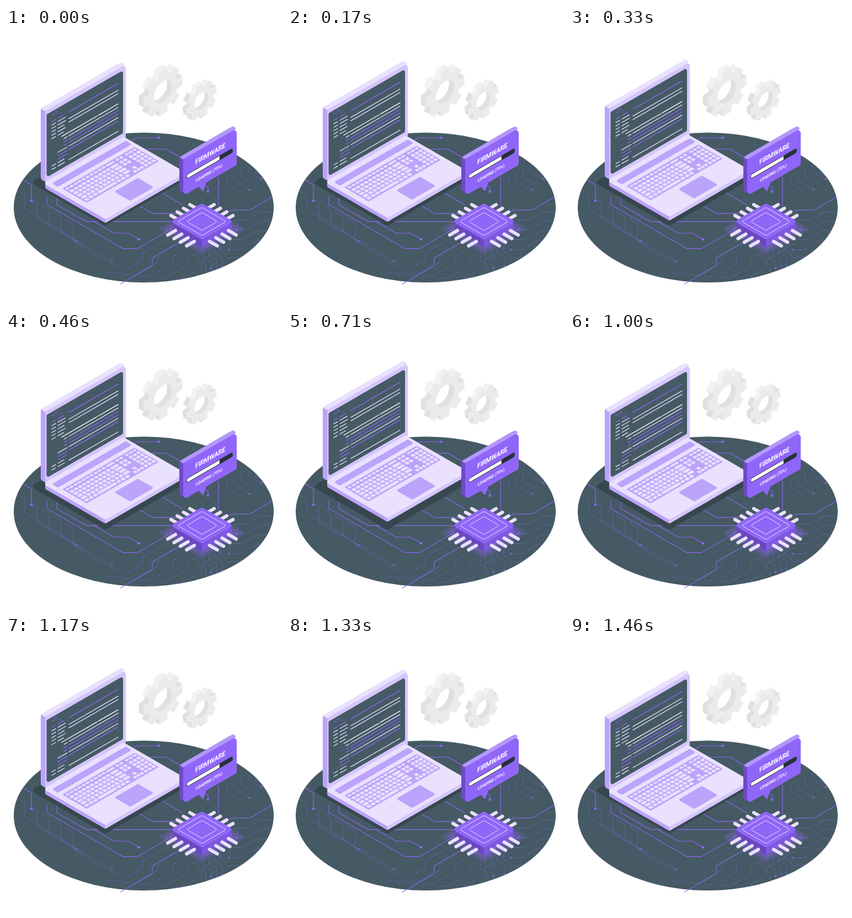
Recreate the animation shown at these times as an HTML page with a canvas. Size 500 px wide and 500 px high, loop 1.5 s.

```html
<!DOCTYPE html>
<html lang="en">
<head>
<meta charset="utf-8">
<title>Firmware</title>
<style>
html, body { margin: 0; width: 100%; height: 100%; overflow: hidden; background: #fff; }
canvas { display: block; width: 100%; height: 100%; }
</style>
</head>
<body>
<canvas id="stage" width="500" height="500"></canvas>
<script>
const ctx = document.getElementById('stage').getContext('2d');
const PURPLE = '#9066f8', MID = '#bca3fb', SOFT = '#d5c5fd', PALE = '#e9e1fd';
const SLATE = '#455a64', DARK = '#263238';
const LOOP = 1500, STEPS = 36, LIFT = 10;
const COS = Math.cos(Math.PI / 6), SLOPE = Math.tan(Math.PI / 6);

function seeded(seed) {
  return () => (seed = seed * 16807 % 2147483647) / 2147483647;
}

function rounded(points, r) {
  const [ax, ay] = points[0], [zx, zy] = points.at(-1);
  ctx.beginPath();
  ctx.moveTo((ax + zx) / 2, (ay + zy) / 2);
  points.forEach((p, i) => ctx.arcTo(...p, ...points[(i + 1) % points.length], r));
  ctx.closePath();
}

function shape(points, color, r = 0) {
  rounded(points, r);
  ctx.fillStyle = color;
  ctx.fill();
}

function line(x1, y1, x2, y2, color, width) {
  ctx.strokeStyle = color;
  ctx.lineWidth = width;
  ctx.beginPath();
  ctx.moveTo(x1, y1);
  ctx.lineTo(x2, y2);
  ctx.stroke();
}

function disc(x, y, rx, ry, color) {
  ctx.fillStyle = color;
  ctx.beginPath();
  ctx.ellipse(x, y, rx, ry, 0, 0, 7);
  ctx.fill();
}

// Floor rectangle from its left corner: a runs up-right, b runs down-right.
function floor(x, y, a, b) {
  const at = (u, v) => [x + u + v, y + (v - u) * SLOPE];
  return [at(0, 0), at(a, 0), at(a, b), at(0, b)];
}

// Wall rectangle from its top left corner.
function wall(x, y, w, h) {
  return [[x, y], [x + w, y - w * SLOPE], [x + w, y - w * SLOPE + h], [x, y + h]];
}

function slab(x, y, a, b, height, [top, left, right], r) {
  const sides = ctx.createLinearGradient(x, 0, x + a + b, 0), corner = b / (a + b);
  [[0, left], [corner, left], [corner, right], [1, right]].forEach(s => sides.addColorStop(...s));
  for (let dy = height; dy > 0; dy -= 0.5) shape(floor(x, y + dy, a, b), sides, r);
  shape(floor(x, y, a, b), top, r);
}

function panel(x, y, w, h, depth, [top, left, front], r) {
  const rise = depth * SLOPE;
  for (let d = depth; d > 0; d -= 0.5) shape(wall(x - d, y - d * SLOPE, w, h), left, r);
  shape([[x - depth, y - rise], [x + w - depth, y - w * SLOPE - rise], [x + w, y - w * SLOPE], [x, y]], top, 2);
  shape(wall(x, y, w, h), front, r);
}

function onPlane(x, y, isFloor, draw) {
  ctx.save();
  ctx.transform(COS, -0.5, isFloor ? COS : 0, isFloor ? 0.5 : 1, x, y);
  draw();
  ctx.restore();
}

function box(x, y, w, h, r, color) {
  ctx.fillStyle = color;
  ctx.beginPath();
  ctx.roundRect(x, y, w, h, r);
  ctx.fill();
}

// Moves: h across, v down, d down-right, u up-right; lengths may be negative.
function trace(x, y, moves, width, end) {
  ctx.strokeStyle = PURPLE;
  ctx.lineWidth = width;
  ctx.beginPath();
  ctx.moveTo(x, y);
  moves.split(' ').forEach(move => {
    const n = parseFloat(move.slice(1));
    x += move[0] === 'v' ? 0 : n;
    y += n * { h: 0, v: 1, d: SLOPE, u: -SLOPE }[move[0]];
    ctx.lineTo(x, y);
  });
  ctx.stroke();
  if (end) disc(x, y, 2.6, 2, PURPLE);
}

function dimCircuit() {
  const random = seeded(11), upTo = n => random() * n;
  ctx.globalAlpha = 0.5;
  for (let i = 0; i < 5; i++) {
    trace(20 + i * 22, 294 + i * 13, `d14 v${26 + upTo(8)} d${60 + upTo(40)}`, 0.8, i % 2);
    trace(182 + i * 30, 444 + i * 3, `h${26 - i * 3} u40 v-13 u52`, 0.8);
    trace(388 - i * 10, 388 + i * 5, `v${12 + upTo(10)} d14 v${10 + upTo(10)}`, 0.8, i % 2);
    trace(484 - i * 3, 333 + i * 17, `h${-16 - upTo(8)} u${-22 - upTo(12)} h-20`, 0.8, i % 2);
    trace(400 + i * 13, 268 - i * 6, `v${10 + upTo(8)} d${20 + upTo(10)}`, 0.8, i % 2);
  }
  ctx.globalAlpha = 1;
}

function brightCircuit() {
  const width = 1.1;
  trace(30, 274.8, 'd16 v29', width, true);
  trace(74, 306, 'v14 d138 h26 u62', width);
  trace(92, 306, 'v14 d53 h157', width);
  trace(160, 351, 'd36 h26 d19', width, true);
  trace(228, 204, 'u9 h40', width, true);
  trace(255, 219.5, 'h35 d26', width);
  trace(490, 302, 'u-48 h-34 u-16', width);
  trace(238, 320, 'd28 h46', width);
  trace(278, 296, 'd42', width);
  trace(385, 270, 'v53', width);
  trace(360, 285, 'd6 v8', width, true);
}

function platform() {
  disc(249.5, 325.2, 235.5, 135.8, SLATE);
  ctx.save();
  ctx.clip();
  dimCircuit();
  brightCircuit();
  ctx.restore();
  trace(207, 464, 'u58 v-14 u61', 1.1);
  shape(floor(44, 280, 146, 136), '#37474f', 5);
}

function gear(cx, cy, radius, phase, depth) {
  const teeth = 8, outline = [];
  for (let i = 0; i < teeth * 4; i++) {
    const side = i % 4 < 2 ? -1 : 1, tip = i % 4 === 1 || i % 4 === 2;
    const angle = phase + Math.floor(i / 4) * 2 * Math.PI / teeth + side * (tip ? 0.2 : 0.3);
    const reach = radius * (tip ? 1 : 0.75);
    outline.push([Math.cos(angle) * reach, Math.sin(angle) * reach]);
  }
  const place = ([u, v], back) => [cx + u * COS - back * depth, cy - u / 2 + v - back * depth * SLOPE];
  outline.forEach((p, i) => {
    const q = outline[(i + 1) % outline.length];
    const facing = Math.atan2(p[1] + q[1], p[0] + q[0]);
    const color = facing < -0.7 && facing > -2.5 ? '#f2f2f2' : '#e0e0e0';
    shape([place(p, 0), place(q, 0), place(q, 1), place(p, 1)], color);
  });
  shape(outline.map(p => place(p, 0)), '#ebebeb');
  ctx.save();
  const hole = radius * 0.46;
  onPlane(cx, cy, false, () => disc(0, 0, hole, hole, '#e0e0e0'));
  ctx.clip();
  onPlane(...place([0, 0], 1), false, () => disc(0, 0, hole, hole, '#fff'));
  ctx.restore();
}

function codeLines() {
  const random = seeded(5);
  ctx.lineCap = 'round';
  for (let row = 0; row < 15; row++) {
    const nested = row > 6 && row < 13, titled = row === 6;
    const isPurple = row === 0 || (row > 7 && row < 13 && row !== 10);
    const color = isPurple ? PURPLE : titled ? '#fff' : PALE;
    const y = x => 169.6 + row * 6.2 - (x - 83) * SLOPE;
    const dash = (a, b) => line(a, y(a), b, y(b), color, 1.3);
    if (titled) {
      dash(101, 165);
      dash(167, 203);
      continue;
    }
    if (!nested) dash(83, 90);
    dash(nested ? (row < 10 ? 105 : 94) : 94, nested ? 111 : 104 + random() * 5);
    if (![1, 4, 5, 12, 13].includes(row)) dash(114, 203);
  }
  onPlane(82, 161, false, () => {
    ctx.fillStyle = PURPLE;
    ctx.font = '10px Roboto, sans-serif';
    ctx.fillText('</>', 0, 0);
  });
  ctx.lineCap = 'butt';
  for (let i = 0; i < 3; i++) disc(96 + i * 2.5, 155.5 - i * 1.4, 0.8, 0.7, PURPLE);
}

function keyboard() {
  const rows = 6;
  box(0, 0, 151, 51, 2, MID);
  for (let row = 0; row < rows; row++) {
    const keys = (from, count, pitch, width) => {
      for (let i = 0; i < count; i++) box(from + i * pitch, 3 + row * 7.8, width, row ? 5.8 : 4.2, 0.8, PALE);
    };
    const last = row === rows - 1;
    if (last) {
      keys(3, 3, 9, 7);
      keys(30, 1, 0, 38);
      keys(70, 3, 9, 7);
    } else {
      keys(3, 1, 0, 6 + row);
      keys(11 + row, 9, 8.4, 6.4);
      keys(87 + row, 1, 0, 16 - row);
    }
    if (row < 3) keys(107, 2, 8, 6);
    if (row === 4) keys(111, 1, 0, 6);
    if (last) keys(105, 3, 7, 5.5);
    keys(127, 3, 8, 6);
  }
}

function laptop() {
  panel(71, 150.8, 146, 132, 8, [PALE, MID, SOFT], 4);
  shape(wall(73.5, 156.5, 138.5, 114), SLATE, 3);
  codeLines();
  slab(67, 281, 146, 113, 7, [PALE, MID, SOFT], 4);
  shape(floor(83, 281.5, 134, 11), MID, 2);
  onPlane(102, 291, true, keyboard);
  shape(floor(196, 296.5, 43, 29), MID, 2);
}

function pins(reach, y, direction, length) {
  for (let i = 0; i < 4; i++) {
    for (const side of [-1, 1]) {
      const x = 355 + side * (reach + direction * i * 11.4), py = y + i * 6.55;
      line(x, py, x - side * length, py + direction * length * SLOPE, PALE, 6);
    }
  }
}

function chip() {
  const square = (half, y) => floor(355 - half, y, half, half);
  ctx.globalAlpha = 0.2;
  for (let half = 80; half > 55; half -= 9) shape(square(half, 364), PURPLE, 4);
  ctx.globalAlpha = 1;
  ctx.lineCap = 'round';
  pins(22, 320, 1, 10);
  slab(298, 350.5, 57, 57, 14, [PURPLE, '#6c48bf', '#7f58df'], 4);
  ctx.strokeStyle = PALE;
  ctx.lineWidth = 1;
  for (const half of [44, 28]) {
    rounded(square(half, 350.5), 2);
    ctx.stroke();
  }
  pins(62, 375, -1, 14);
  ctx.lineCap = 'butt';
}

function label(text, x, y, font) {
  onPlane(x, y, false, () => {
    ctx.fillStyle = '#fff';
    ctx.font = font + ' Roboto, sans-serif';
    ctx.fillText(text, 0, 0);
  });
}

function bubble() {
  panel(321, 238, 97, 66, 7, ['#b497fa', '#7049c8', PURPLE], 5);
  shape([[348, 286], [364, 277], [357, 296]], PURPLE);
  label('FIRMWARE', 343, 247.5, '700 12.4px');
  onPlane(327, 265.5, false, () => {
    box(0, 0, 97, 8.5, 4.25, DARK);
    box(1, 1, 68, 6.5, [3.25, 0, 0, 3.25], '#fff');
  });
  label('LOADING (75%)', 344, 279, '600 7.9px');
}

function render(now) {
  const step = Math.floor(((now + 5) % LOOP) / LOOP * STEPS);
  const phase = (step + 0.5) / STEPS;
  const rise = LIFT * (1 - Math.abs(1 - 2 * phase));
  ctx.fillStyle = '#fff';
  ctx.fillRect(0, 0, 500, 500);
  platform();
  gear(284.5, 115.5, 41, 0, 9);
  gear(354, 132, 32, -0.2, 7);
  ctx.save();
  ctx.translate(0, 0.3 - rise);
  laptop();
  ctx.restore();
  chip();
  bubble();
}

let start;
function tick(now) {
  start ??= now;
  render(now - start);
  requestAnimationFrame(tick);
}
requestAnimationFrame(tick);
</script>
</body>
</html>
```
